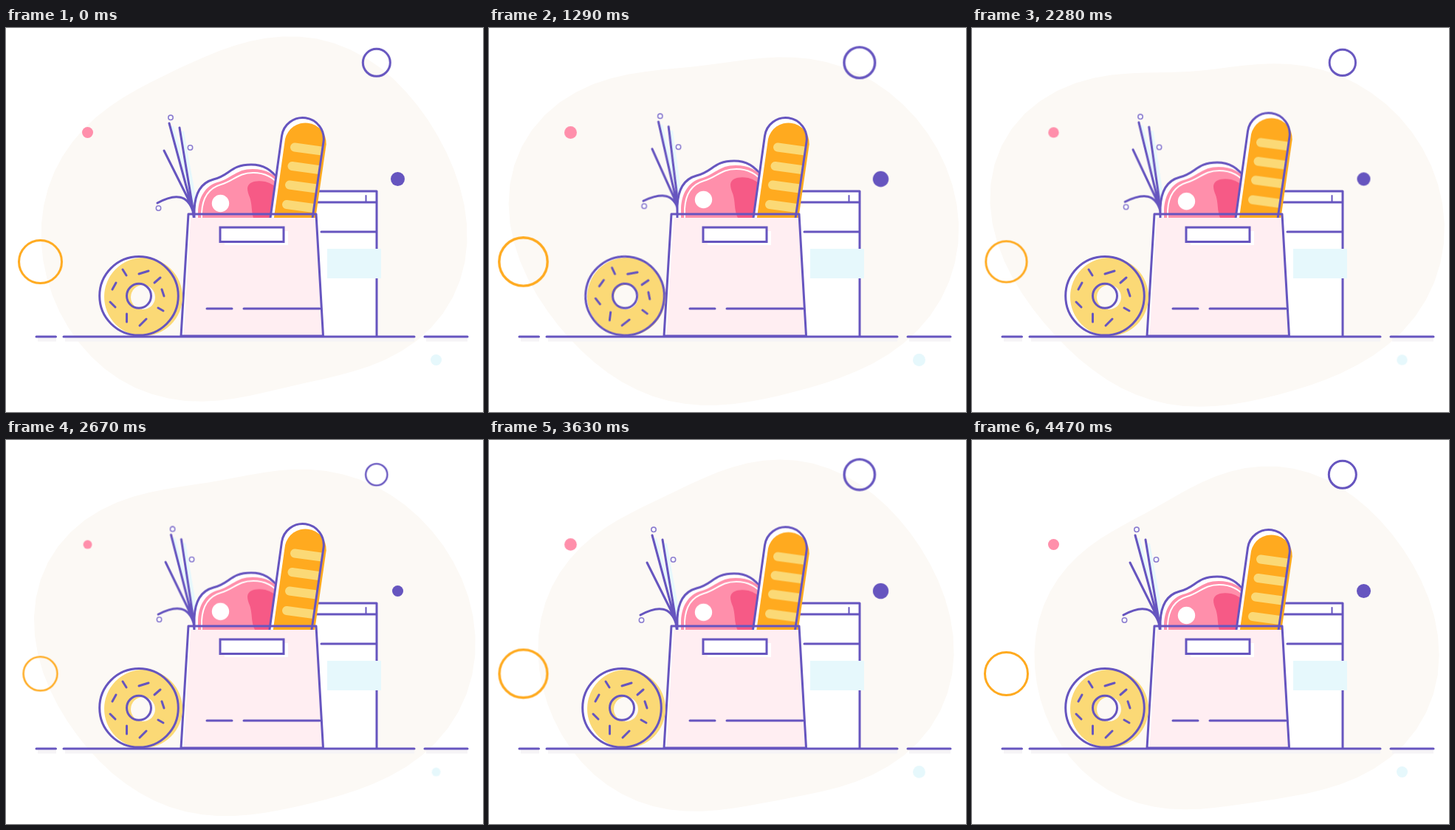
An HTML page that plays this animation: 646 by 520 pixels, repeating every 4.5 s.

```html
<!DOCTYPE html>
<html lang="en">
<head>
<meta charset="utf-8">
<title>Groceries</title>
<style>
  html, body { margin: 0; width: 100%; height: 100%; overflow: hidden; background: #fff; }
  svg { display: block; width: 646px; height: 520px; }
  .line { fill: none; stroke: #6655bf; stroke-width: 3; stroke-linecap: round; stroke-linejoin: round; }
  .paper { fill: #fff; }
  .cream { fill: #fcf9f5; }
  .ice { fill: #e6f8fc; }

  .pulse, .bread, .meat, .stems, .roll {
    animation: 4500ms cubic-bezier(.37, 0, .63, 1) infinite;
  }
  .pulse { transform-box: fill-box; transform-origin: center; animation-name: pulse; }
  .bread { animation-name: bread; }
  .meat { animation-name: meat; }
  .stems { transform-origin: 273px 330px; animation-name: sway; }
  .roll { transform-origin: 180px 363px; animation-name: roll; }

  @keyframes pulse {
    0%, 100% { transform: scale(1); }
    15.5% { transform: scale(.83); }
    38% { transform: scale(1.3); }
    58.7% { transform: scale(.79); }
    79.2% { transform: scale(1.12); }
  }
  @keyframes bread {
    0%, 29.5%, 100% { transform: translateY(0); }
    14.6% { transform: translateY(-3px); }
    59.3% { transform: translateY(-8px); }
  }
  @keyframes meat {
    0%, 100% { transform: translateY(0); }
    24.4% { transform: translateY(-5.5px); }
    44% { transform: translateY(-2px); }
    67.5% { transform: translateY(-6.5px); }
  }
  @keyframes sway {
    0%, 6.5%, 77%, 100% { transform: rotate(0); }
    29% { transform: rotate(2.4deg); }
  }
  @keyframes roll {
    0%, 20%, 36.5%, 100% { transform: translateX(0) rotate(0); }
    28.7% { transform: translateX(4px) rotate(7deg); }
  }
</style>
</head>
<body>
<svg viewBox="0 0 646 520">
  <defs>
    <clipPath id="aboveBag"><rect width="646" height="257"/></clipPath>
    <path id="loaf" d="M355.5 275 373.5 146A28.5 28.5 0 0 1 430 154L412.5 275"/>
    <clipPath id="crust"><use href="#loaf"/></clipPath>
  </defs>

  <path id="blob" class="cream"/>

  <path d="M43 422H68M80 422H553M569 422H625" stroke="#f6f4f6" stroke-width="5"/>

  <g id="carton">
    <path class="paper" d="M415 221H502V418H415Z"/>
    <path class="line" d="M420 221H502V417M420 236H502M427 276H502"/>
    <path class="line" style="stroke-width:2" d="M487.5 227V235"/>
    <path class="ice" d="M435 299H508V339H435Z"/>
  </g>

  <path class="paper" d="M247 252H420L429 417H237Z"/>

  <g clip-path="url(#aboveBag)">
    <g class="stems">
      <path d="M225 133 256 240M239 140 257 240" fill="none" stroke="#e6f8fc" stroke-width="4"/>
      <path class="line" d="M221 129 257 262M235 135 255 256M214 166 251 240Q255 248 256 262M205 237Q243 216 253 248L255 262"/>
      <g class="line" style="fill:#fff;stroke:#8c7ed0;stroke-width:1.6">
        <circle cx="223" cy="121.3" r="3.2"/>
        <circle cx="249.5" cy="162" r="3.2"/>
        <circle cx="206.5" cy="244" r="3.2"/>
      </g>
    </g>

    <g class="meat">
      <path class="line" style="fill:#fff" d="M255 270V246C256 222 266 209 281 205C303 200 304 185 332 185C348 185 361 193 369 206V270"/>
      <path fill="#ff8fab" d="M260 270V249C261 229 270 214 286 209C306 204 311 191 334 191C352 191 364 198 374 210V270Z"/>
      <path fill="none" stroke="#fff" stroke-width="2" d="M265 270V250C266 231 274 217 291 212C309 207 314 196 335 196C351 196 363 203 371 214"/>
      <path fill="#f65a86" d="M327 217C328 208 339 206 351 208Q363 211 372 222V270H342C330 255 335 243 330 229Q327 222 327 217Z"/>
      <circle class="paper" cx="290.5" cy="237.5" r="11.7"/>
    </g>

    <g class="bread">
      <use href="#loaf" class="paper"/>
      <path fill="#ffaa1f" d="M360.3 275 378 150.500A28.2 28.2 0 0 1 433.7 157.500L416.7 275Z"/>
      <g clip-path="url(#crust)">
        <path d="M391 161.5l44 6M387.5 187l44 6M384 212.5l44 6M380 239l44 6" fill="none"
              stroke="#fbd976" stroke-width="12" stroke-linecap="round"/>
      </g>
      <use href="#loaf" class="line"/>
    </g>
  </g>

  <g id="bag">
    <path fill="#ffeef2" d="M250 257H420L429 417H240.5Z"/>
    <path class="paper" d="M296 275H382V294H296Z"/>
    <path class="line" d="M247 252H420L429.5 417H237Z"/>
    <path class="line" style="fill:#fff;stroke-linejoin:miter" d="M290 270H376V289.5H290Z"/>
    <path class="line" d="M272 380H306M322 380H425"/>
  </g>

  <g id="donut">
    <circle class="paper roll" cx="180" cy="362.8" r="53.3"/>
    <circle cx="186" cy="364" r="53" fill="#fbd976"/>
    <circle class="cream" cx="185.5" cy="364.5" r="16.5"/>
    <g class="roll line">
      <circle cx="180" cy="362.8" r="53.3"/>
      <circle cx="180" cy="362.8" r="16.5"/>
      <path d="M158 327l5 8M180 333l13-4M201 345l8-7M211 354l3 9M206 379l7 4M181 403l9-9M163.500 387v11M141 371l7 7M144 354l5-9"/>
    </g>
  </g>

  <path class="line" d="M41 418H67.5M78 418H553M567 418H625"/>

  <circle class="pulse line" cx="501.8" cy="46.8" r="18.5"/>
  <circle class="pulse line" style="stroke:#ffaa1f" cx="46.5" cy="316.5" r="29"/>
  <circle class="pulse" cx="110.5" cy="141.5" r="7.5" fill="#ff8fab"/>
  <circle class="pulse" cx="530.5" cy="204.5" r="9.5" fill="#6655bf"/>
  <circle class="pulse ice" cx="582.5" cy="449.5" r="7.5"/>
</svg>

<script>
  const DURATION = 4500, STEPS = 45, POINTS = 72;
  const { sin, cos, PI } = Math;

  // Radius of the blob at angle a (clockwise from the right) and progress p of the loop:
  // a resting shape, a swell that comes and goes, and a late drift to the lower right.
  function radius(a, p) {
    const rest = 264 + 6 * cos(a) + 24 * cos(2 * a) - 13 * sin(2 * a) + 7 * sin(3 * a) + 7 * sin(4 * a);
    const swell = 6 - 6 * cos(a) + 7 * sin(a) + 17 * cos(2 * a) + 18 * sin(2 * a) - 20 * sin(3 * a);
    const drift = 28 * cos(a - 0.6) - 16;
    return rest + swell * sin(PI * p ** 0.8) ** 4 + drift * p ** 3;
  }

  function outline(p) {
    const points = Array.from({ length: POINTS }, (_, i) => {
      const a = 2 * PI * i / POINTS, r = radius(a, p);
      return `${(330 + r * cos(a)).toFixed(1)} ${(265 + r * sin(a)).toFixed(1)}`;
    });
    return `M${points.join("L")}Z`;
  }

  const frames = Array.from({ length: STEPS + 1 }, (_, i) => ({ d: `path("${outline(i / STEPS)}")` }));
  const blob = document.getElementById("blob");
  blob.setAttribute("d", outline(0));
  blob.animate(frames, { duration: DURATION, iterations: Infinity });
</script>
</body>
</html>
```
